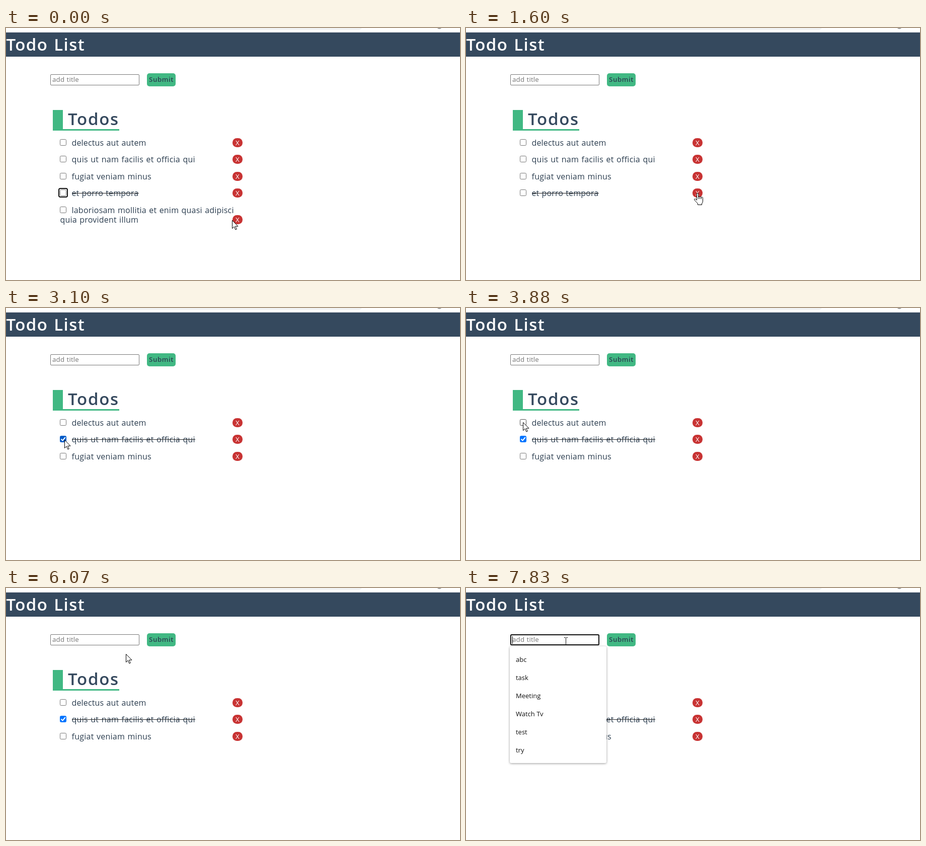
Write an HTML page that moves like this. It is 902 by 501 pixels and loops after 8 s.

```html
<!DOCTYPE html>
<html lang="en">
<head>
<meta charset="utf-8">
<title>Todo List</title>
<style>
html, body { margin: 0; width: 100%; height: 100%; overflow: hidden; background: #fff; }
svg { display: block; width: 902px; height: 501px; }
text { font-family: "Open Sans", "Noto Sans", sans-serif; font-size: 16px; fill: #2c3e50; word-spacing: .06em; white-space: pre; }
.small { font-size: 13.33px; letter-spacing: .15px; }
.head { font-size: 33px; font-weight: 600; }
.menu text { font-size: 13px; fill: #111; word-spacing: 0; }
.menu > rect { fill: #fff; filter: drop-shadow(0 1px 2px #0006); }
.line { fill: none; stroke: #101010; }
.arrow, .hand { fill: #fff; stroke: #000; stroke-linejoin: round; }
</style>
</head>
<body>
<svg viewBox="0 0 902 501">
  <rect x="106" y="-12" width="602" height="16" rx="8" fill="#f1f3f4"/>
  <circle cx="861" cy="-4" r="5" fill="none" stroke="#777" stroke-width="1.5"/>
  <rect y="8" width="902" height="1" fill="#dadce0"/>
  <rect y="9" width="902" height="48" fill="#35495e"/>
  <text class="head" x=".5" y="45" letter-spacing="1.4" style="fill:#fff">Todo List</text>

  <rect id="field" fill="#fff"/>
  <text class="small" x="92" y="107" style="fill:#757575">add title</text>
  <rect id="caret" x="92" y="96" width="1" height="15"/>
  <rect x="280" y="90" width="57" height="26" rx="5" fill="#41b883"/>
  <text class="small" x="308.5" y="107" text-anchor="middle" font-weight="600" style="letter-spacing:.5px">Submit</text>

  <path d="M93 163h20v38h112v3H93z" fill="#41b883"/>
  <text class="head" x="123" y="193" letter-spacing="1.7" style="fill:#35495e">Todos</text>

  <g id="list"></g>
  <rect id="ring" class="line" x="105" y="319" width="17" height="17" rx="3" stroke-width="2"/>
  <g id="menu" class="menu"><rect x="87" y="116" width="192" height="232" rx="3"/></g>

  <g id="cursor">
    <circle id="glow" r="12" fill="#ff0" fill-opacity=".6"/>
    <path class="arrow" d="M1.5 1.5v16l3.8-3.5 2.6 6 2.4-1-2.6-5.8H13z"/>
    <g class="hand">
      <path d="M-.5 13V2a1.6 1.6 0 0 1 3.2 0v6a1.6 1.6 0 0 1 3 .6 1.5 1.5 0 0 1 3 .6 1.5 1.5 0 0 1 2.8 1.2V16q0 3-2 5v2.5h-8V21Q-1.5 18-5 14q-1-1.6.5-2.3 1.5-.3 4 2.5z"/>
      <path d="M2.7 8v4M5.7 8.6v3.4M8.7 9.2v3" fill="none"/>
    </g>
    <path class="line beam" d="M-1-7.5h2.5l1 1 1-1H6M2.5-7V7M-1 7.5h2.5l1-1 1 1H6"/>
  </g>
</svg>
<script>
const LOOP = 8000, NEVER = 1e9;
const $ = id => document.getElementById(id);
const between = (t, a, b) => t >= a && t < b;
const show = (el, on) => el.style.display = on ? '' : 'none';

function set(el, attrs) {
  for (const k in attrs) el.setAttribute(k, attrs[k]);
}

function add(parent, tag, attrs, text) {
  const el = document.createElementNS('http://www.w3.org/2000/svg', tag);
  set(el, attrs || {});
  if (text) el.textContent = text;
  return parent.appendChild(el);
}

// y: text baseline, w: text width, gap: letter spacing, done: struck-out period
const rows = [
  { y: 234, w: 148, gap: .15, text: 'delectus aut autem', done: [4280, 5060], checked: true },
  { y: 267, w: 245, gap: .27, text: 'quis ut nam facilis et officia qui', done: [3100, LOOP], checked: true },
  { y: 301, w: 158, gap: .25, text: 'fugiat veniam minus', done: [NEVER, NEVER] },
  { y: 334, w: 133, gap: .12, text: 'et porro tempora', done: [0, LOOP], gone: 2000 },
  { y: 368, w: 323, gap: .21, text: 'laboriosam mollitia et enim quasi adipisci', more: 'quia provident illum', done: [NEVER, NEVER], gone: 990 }
];

for (const r of rows) {
  const g = r.g = add($('list'), 'g');
  r.end = r.gone || NEVER;
  r.mid = r.y - 6 + (r.more ? 19 : 0);
  r.box = add(g, 'rect', { x: 107.5, y: r.y - 12.5, width: 12, height: 12, rx: 2 });
  r.tick = add(g, 'path', { d: `M109.5 ${r.y - 6.5}l3 3 5.5-6.5`, fill: 'none', stroke: '#fff', 'stroke-width': 2 });
  add(g, 'text', { x: 130.5, y: r.y, 'letter-spacing': r.gap }, r.text);
  if (r.more) add(g, 'text', { x: 107.5, y: r.y + 19, 'letter-spacing': r.gap }, r.more);
  r.strike = add(g, 'rect', { x: 131, y: r.y - 6, width: r.w, height: 1, fill: '#222' });
  add(g, 'rect', { x: 450, y: r.mid - 9, width: 20, height: 18, rx: 8.5, fill: '#c83333' });
  add(g, 'text', { class: 'small', x: 460, y: r.mid + 5, 'text-anchor': 'middle', style: 'fill:#fff' }, 'X');
}

['abc', 'task', 'Meeting', 'Watch Tv', 'test', 'try'].forEach((s, i) =>
  add($('menu'), 'text', { x: 99, y: 147 + 36 * i }, s));

// first step, last step, step count, bend x, y, end x, y
const moves = [
  [70, 360, 5, 442, 384, 456, 381],
  [1140, 1370, 4, 456, 352, 459, 325],
  [1540, 1600, 2, 459, 327, 459, 328],
  [2070, 2240, 3, 280, 325, 140, 303],
  [2330, 2570, 4, 115, 290, 116, 261],
  [2720, 2720, 1, 115, 261, 115, 261],
  [3330, 3880, 8, 114, 240, 112, 226],
  [5590, 6070, 7, 445, 190, 237, 130],
  [6220, 6450, 4, 215, 120, 196, 106]
];
const clicks = [[760, 990], [1770, 2000], [2870, 3100], [4110, 4350], [4890, 5060], [6760, 6910]];

function pointer(t) {
  let x = 448, y = 381;
  for (const [t0, t1, n, bx, by, ex, ey] of moves) {
    if (t < t0) break;
    const step = Math.floor((t - t0) / (t1 - t0 || 1) * (n - 1) + 1.001);
    const p = Math.min(step / n, 1), q = 1 - p;
    x = Math.round(q * q * x + 2 * p * q * bx + p * p * ex);
    y = Math.round(q * q * y + 2 * p * q * by + p * p * ey);
  }
  return [x, y];
}

function draw(t) {
  const [x, y] = pointer(t);
  const inField = between(x, 88, 265) && between(y, 92, 114);
  const focus = t >= 6760;
  let shape = inField ? 'beam' : 'arrow';

  for (const r of rows) {
    const on = between(t, ...r.done);
    const ticked = on && r.checked;
    const hover = between(x, 107, 120) && between(y, r.y - 13, r.y);
    show(r.g, t < r.end);
    show(r.strike, on);
    show(r.tick, ticked);
    const blue = hover ? '#005cc8' : '#0075ff';
    set(r.box, { fill: ticked ? blue : '#fff', stroke: ticked ? blue : hover ? '#4f4f4f' : '#767676' });
    if (t < r.end + 150) {
      if (between(x, 450, 471) && Math.abs(y - r.mid) < 9) shape = 'hand';
      else if (between(x, 131, 131 + r.w) && Math.abs(y - r.y + 6) < 9) shape = 'beam';
    }
  }

  const inset = focus ? 1 : .5;
  set($('field'), {
    x: 88 + inset, y: 92 + inset, width: 177 - 2 * inset, height: 22 - 2 * inset, rx: 1.5,
    stroke: focus ? '#101010' : inField ? '#4f4f4f' : '#767676', 'stroke-width': 2 * inset
  });
  show($('ring'), t < 760);
  show($('menu'), focus);
  show($('caret'), focus && !between(t, 7310, 7830));
  show($('glow'), clicks.some(c => between(t, ...c)));
  for (const s of ['arrow', 'hand', 'beam']) show($('cursor').querySelector('.' + s), s === shape);
  $('cursor').setAttribute('transform', `translate(${x} ${y})`);
}

function frame() {
  draw(performance.now() % LOOP);
  requestAnimationFrame(frame);
}
frame();
</script>
</body>
</html>
```
